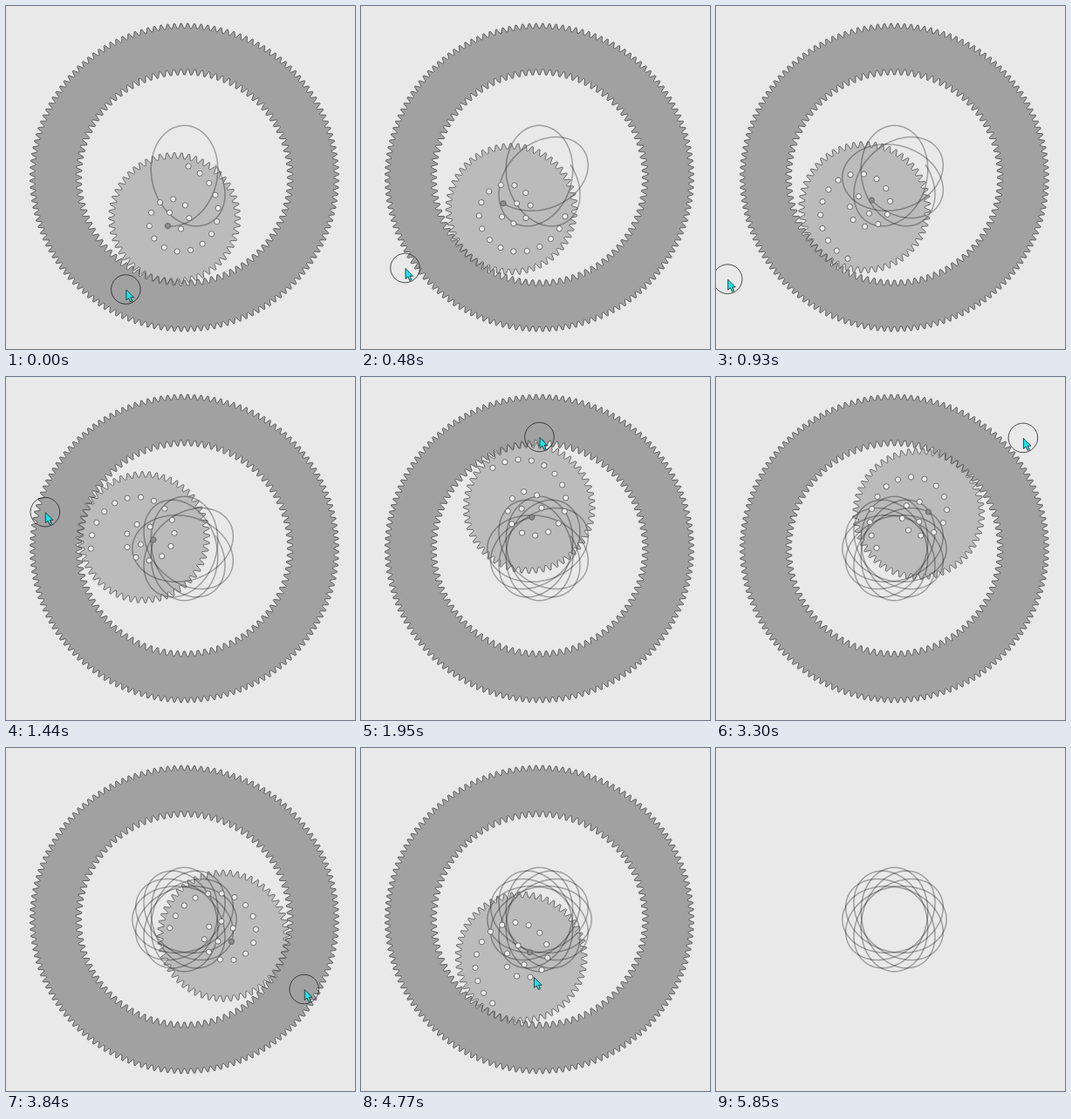
An HTML page with a canvas that plays this animation: 400x394 px, repeating every 7.62 s.

```html
<!DOCTYPE html>
<html>
<head>
<meta charset="utf-8">
<style>
html, body { margin: 0; height: 100%; overflow: hidden; background: #e9e9e9; }
canvas { display: block; }
</style>
</head>
<body>
<canvas id="stage" width="400" height="394"></canvas>
<script>
const ctx = document.getElementById('stage').getContext('2d');
const LOOP = 7620, STEP = 30;
const RELEASE = 4410, LEAVE = 4770, CLEAR = 5850;
const CX = 204.5, CY = 197;
const ORBIT = 48.35, PEN = 11.35;         // wheel orbit and pen distance
const START = 60, LOBE = 150, SPACING = 210, CLOSED = START + 12 * SPACING;
const WHEEL_TEETH = 56, RING_TEETH = 96, OUTER_TEETH = 144;
const HAND_RADIUS = 145, HAND_LEAD = 14;

// Time, wheel angle, drift of the hand's orbit; the last stretch slows down.
const KEYS = [
  [0, 553.6, 0, 0],
  [930, 1305, -67, 42],
  [1950, 2146, 0, 17],
  [2550, 2648, -28, 34],
  [3300, 3275, 38, -32],
  [3780, 3676, 20, 10],
  [4170, 3805.5, 24, -49]
];
const LAST = KEYS[KEYS.length - 1];

const rad = deg => deg * Math.PI / 180;

// Angles are in degrees, clockwise from the top.
const polar = (r, deg, x = 0, y = 0) => [x + r * Math.sin(rad(deg)), y - r * Math.cos(rad(deg))];

function poseAt(t) {
  const next = KEYS.findIndex(key => key[0] > t);
  if (next < 0) return LAST;
  const a = KEYS[next - 1], b = KEYS[next];
  let k = (t - a[0]) / (b[0] - a[0]);
  if (b === LAST) k = 1 - (1 - k) ** 2;
  return a.map((v, i) => v + (b[i] - v) * k);
}

const wheelCentre = angle => polar(ORBIT, angle, CX, CY);
const penDirection = angle => angle - (angle - LOBE) * RING_TEETH / WHEEL_TEETH;
const penPoint = angle => polar(PEN, penDirection(angle), ...wheelCentre(angle));

// Each tooth is a wave clipped to a narrow tip and a narrow valley.
function gearPath(path, x, y, teeth, low, high, turn) {
  const pitch = 360 / teeth;
  for (let i = 0; i < teeth; i++) {
    for (const offset of [0.1, 0.41, 0.59, 0.9]) {
      const r = Math.abs(offset - 0.5) < 0.25 ? high : low;
      path.lineTo(...polar(r, turn + (i + offset) * pitch, x, y));
    }
  }
  path.closePath();
}

const ring = new Path2D();
gearPath(ring, CX, CY, OUTER_TEETH, 171.3, 177, 0);
ring.moveTo(...polar(118, 0.1 * 360 / RING_TEETH, CX, CY));
gearPath(ring, CX, CY, RING_TEETH, 118, 124.5, 0);

// Holes sit on an inward spiral, at equal distances from each other.
const PEN_HOLE = 19;
const holes = [];
for (let i = 0, angle = 0; i < 21; i++) {
  const r = 62 - 2.66 * i, next = r - 2.66;
  holes.push({ r, angle });
  const cosine = (r * r + next * next - 15.45 ** 2) / (2 * r * next);
  angle += Math.acos(Math.max(-1, cosine)) * 180 / Math.PI;
}

function drawCurve(angle) {
  const end = Math.min(angle, CLOSED);
  ctx.strokeStyle = 'rgba(0,0,0,.32)';
  ctx.lineWidth = 1.5;
  // Separate strokes let the translucent line darken where it crosses itself.
  for (let from = START; from < end; from += SPACING) {
    const to = Math.min(end, from + SPACING);
    ctx.beginPath();
    for (let a = from; a < to; a += 3) ctx.lineTo(...penPoint(a));
    ctx.lineTo(...penPoint(to));
    ctx.stroke();
  }
}

function drawRing() {
  ctx.fillStyle = '#a1a1a1';
  ctx.strokeStyle = '#555';
  ctx.lineWidth = 0.9;
  ctx.fill(ring, 'evenodd');
  ctx.stroke(ring);
}

function drawWheel(angle) {
  const [x, y] = wheelCentre(angle);
  const turn = penDirection(angle);
  const wheel = new Path2D();
  gearPath(wheel, x, y, WHEEL_TEETH, 69, 75.5, turn);
  ctx.fillStyle = 'rgba(0,0,0,.2)';
  ctx.strokeStyle = '#606060';
  ctx.lineWidth = 0.9;
  ctx.fill(wheel);
  ctx.stroke(wheel);
  holes.forEach((hole, i) => {
    const direction = turn + hole.angle - holes[PEN_HOLE].angle;
    ctx.beginPath();
    ctx.arc(...polar(hole.r, direction, x, y), 3.1, 0, 7);
    ctx.fillStyle = i === PEN_HOLE ? '#8b8b8b' : '#f0f0f0';
    ctx.fill();
    ctx.stroke();
  });
}

function pointerAt(t, [, angle, driftX, driftY]) {
  if (t < LEAVE) {
    const direction = Math.min(angle + HAND_LEAD, LAST[1]);
    return polar(HAND_RADIUS, direction, CX + driftX, CY + driftY);
  }
  const k = Math.min(1, (t - LEAVE) / 90);
  return [198 + 197 * k, 263 - 105 * k];
}

function drawPointer(x, y, pressed) {
  ctx.strokeStyle = '#222';
  ctx.lineWidth = 0.8;
  if (pressed) {
    ctx.beginPath();
    ctx.arc(x, y, 16.8, 0, 7);
    ctx.stroke();
  }
  ctx.save();
  ctx.translate(x + 0.5, y + 0.5);
  ctx.fillStyle = '#1fe3ea';
  const arrow = new Path2D('M0 0V12L2.7 9.6 4.9 14 7 13 5 8.8H8.6Z');
  ctx.fill(arrow);
  ctx.stroke(arrow);
  ctx.restore();
}

function draw(t) {
  const pose = poseAt(t);
  const angle = pose[1];
  ctx.fillStyle = '#e9e9e9';
  ctx.fillRect(0, 0, 400, 394);
  drawCurve(angle);
  if (t >= CLEAR) return;
  drawRing();
  drawWheel(angle);
  if (t < 5280) drawPointer(...pointerAt(t, pose), t < RELEASE);
}

ctx.lineJoin = 'round';
const begin = performance.now();
function tick() {
  const t = (performance.now() - begin) % LOOP;
  draw(Math.floor(t / STEP) * STEP);
  requestAnimationFrame(tick);
}
tick();
</script>
</body>
</html>
```
